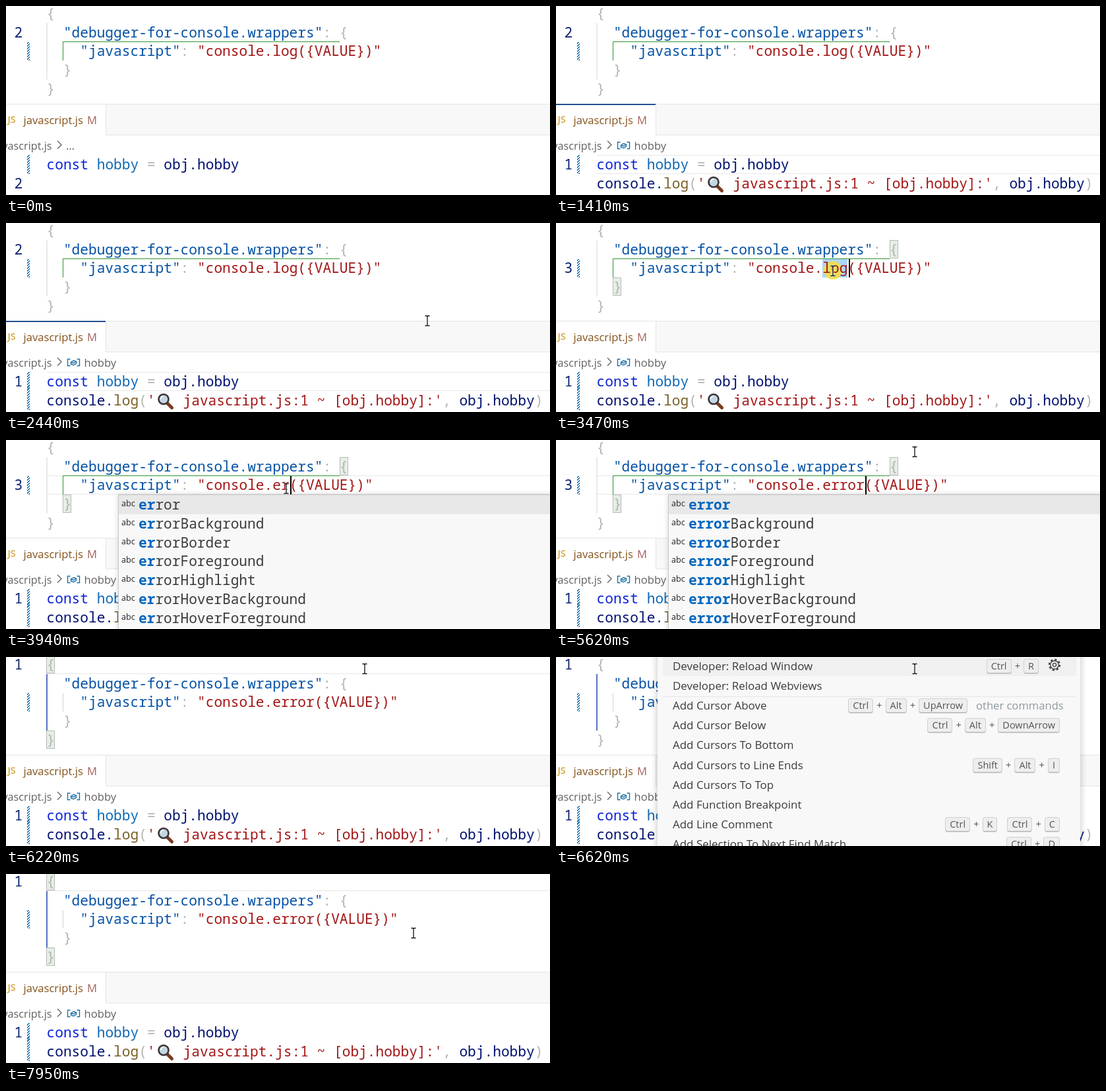
Write an HTML page that moves like this. It is 825x288 px and loops after 8 s.

```html
<!DOCTYPE html>
<html lang="en">
<head>
<meta charset="utf-8">
<title>Console wrapper demo</title>
<style>
html, body { margin: 0; width: 100%; height: 100%; overflow: hidden; background: #fff; }
#stage { position: relative; width: 825px; height: 288px; overflow: hidden; background: #fff; }
#stage div, #stage svg { position: absolute; }
.code { font: 21.17px/28.7px "Noto Sans Mono", monospace; white-space: pre; margin-top: -.7px; font-variant-ligatures: none; }
.ui { font: 16.6px/24px "Open Sans", sans-serif; white-space: pre; }
.num { left: 12.5px; color: #0b216f; }
.p { color: #b3b3b3; }
.k { color: #0451a5; }
.s { color: #a31515; }
.kw { color: #0a22d8; }
.c { color: #0f68b4; }
.v { color: #001070; }
.f { color: #795e26; }
.row { left: 62px; width: 763px; height: 27px; border: solid #e8e8e8; border-width: 1px 0; }
.brace { width: 11px; height: 26px; background: rgba(0,100,0,.1); border: 1px solid #b9b9b9; }
.hatch { left: 32px; width: 4px; background: repeating-linear-gradient(-45deg, #1672ad 0 1.6px, #fff 1.6px 2.9px); }
.caret { width: 2px; height: 28px; background: #000; }
#sel { background: #add6ff; top: 55px; height: 28px; }
#disc { width: 28px; height: 28px; margin: -14px; border-radius: 50%; background: #f0df48; opacity: .9; }
#bar { left: 152px; top: 150px; width: 673px; height: 46px; background: #f8f8f8; border-bottom: 1px solid #e5e5e5; }
#popup { left: 170px; top: 83px; width: 700px; height: 240px; background: #f8f8f8; border: 1px solid #c8c8c8; box-shadow: 0 0 8px rgba(0,0,0,.16); }
#popup .code { left: 30px; color: #3b3b3b; }
#popup b { color: #0066bf; font-weight: 600; }
#popup .abc { left: 4px; font: 500 12.6px/24px "Open Sans", sans-serif; color: #222; }
#pick { left: 0; top: 0; width: 700px; height: 28.5px; background: #e8e8e8; }
#palette { left: 154px; top: -40px; width: 641px; height: 380px; background: #f8f8f8; box-shadow: 0 0 9px 2px rgba(0,0,0,.18); }
#palette .item { left: 8px; width: 627px; height: 30px; border-radius: 4px; color: #3b3b3b; font: 16.95px/30px "Open Sans", sans-serif; white-space: pre; }
#palette .item span { padding-left: 15px; }
#palette .note { left: 483px; color: #8f999f; font-size: 16.6px; }
#palette .keys { top: 0; height: 30px; display: flex; align-items: center; font-size: 14.5px; color: #555; }
.keys kbd { font: 14.5px/20px "Open Sans", sans-serif; padding: 0 6px; border: 1px solid #d0d0d0; border-bottom-color: #bbb; border-radius: 4px; background: #eee; box-shadow: 0 1px 0 #ccc; }
.keys i { font-style: normal; width: 18.5px; text-align: center; }
.keys u { width: 15px; }
</style>
</head>
<body>
<div id="stage">
  <div id="rowUp" class="row"></div>
  <div id="rowLow" class="row" style="top:227px"></div>
  <div id="sel"></div>
  <div id="braceA" class="brace"></div>
  <div id="braceB" class="brace"></div>
  <div id="disc"></div>

  <svg width="825" height="150" fill="none">
    <path id="outer" d="M62 26V112" />
    <path id="inner" d="M86.500 55V83" stroke="#d3d3d3" />
    <path id="green" d="M86.500 83V54.500H506" stroke="#319331" />
  </svg>

  <div id="numUp" class="code num"></div>
  <div id="numLow" class="code num"></div>
  <div class="hatch" style="top:55px;height:28px"></div>
  <div id="hatchLow" class="hatch" style="top:227px"></div>

  <div id="json"></div>

  <div style="left:0;top:149px;width:825px;height:1px;background:#e5e5e5"></div>
  <div id="bar"></div>
  <div style="left:151px;top:150px;width:1px;height:47px;background:#e5e5e5"></div>
  <div id="tabTop" style="left:0;top:149px;width:151px;height:1.5px;background:#24508f"></div>
  <div class="ui" style="left:2.5px;top:161px;font-size:14.5px;font-weight:600;color:#d3a63a">JS</div>
  <div class="ui" style="left:26.5px;top:162px;color:#85521a">javascript.js</div>
  <div class="ui" style="left:123px;top:162px;color:#a8605a">M</div>

  <div class="ui" style="right:755.5px;top:201px;color:#616161;font-size:16.2px">javascript.js</div>
  <svg width="120" height="24" style="left:0;top:200px" fill="none">
    <path d="M78 5.500l6 6-6 6" stroke="#616161" stroke-width="1.3" />
    <path id="symbol" d="M97.500 7.500h-4v10h4M107.500 7.500h4v10h-4M98.500 12l4-2.500 4 1.500v3l-4 2.500-4-1.500zl4 1.500 4-2.500" stroke="#1d6fa5" stroke-width="1.400" />
  </svg>
  <div id="crumb" class="ui" style="top:201px;color:#616161"></div>

  <div class="code" style="left:61.5px;top:227.8px"><span class="kw">const</span> <span class="c">hobby</span> <span class="p">=</span> <span class="v">obj.hobby</span></div>
  <div id="logLine" style="left:0;top:256.6px">
    <div class="code" style="left:61.5px"><span class="v">console.</span><span class="f">log</span><span class="p">(</span><span class="s">'</span></div>
    <svg width="30" height="30" style="left:227px;top:0">
      <path d="M18 18l6.500 6.500" stroke="#7a3b20" stroke-width="5" stroke-linecap="round" />
      <circle cx="12" cy="11.500" r="7.500" fill="#c3d6e2" stroke="#3a3335" stroke-width="2.600" />
      <path d="M8 11a4 4 0 0 1 4-4" stroke="#fff" stroke-width="1.600" fill="none" />
    </svg>
    <div class="code" style="left:268.5px"><span class="s">javascript.js:1 ~ [obj.hobby]:'</span><span class="p">,</span> <span class="v">obj.hobby</span><span class="p">)</span></div>
  </div>

  <div id="caret" class="caret"></div>
  <div id="popup"><div id="pick"></div></div>
  <div id="palette"></div>
  <svg id="mouse" width="12" height="20" viewBox="-6 -10 12 20" style="margin:-10px 0 0 -6px" fill="none">
    <path d="M-3.500-7.500h2.500l1 1 1-1h2.500M0-6.500V6.500M-3.500 7.500h2.500l1-1 1 1h2.500" stroke="#fff" stroke-width="3" opacity=".7" />
    <path d="M-3.500-7.500h2.500l1 1 1-1h2.500M0-6.500V6.500M-3.500 7.500h2.500l1-1 1 1h2.500" stroke="#111" stroke-width="1.300" />
  </svg>
</div>

<script>
const LOOP = 8000, CH = 12.7, LH = 28.7, LEFT = 61.5;
const $ = id => document.getElementById(id);
const rowTop = line => 26.2 + LH * (line - 2);
const colX = col => LEFT + CH * col;

function add(parent, cls, html, style) {
  const el = document.createElement('div');
  el.className = cls;
  el.innerHTML = html;
  Object.assign(el.style, style);
  parent.append(el);
  return el;
}

const json = [
  '<span class="p">{</span>',
  '  <span class="k">"debugger-for-console.wrappers"</span><span class="p">: {</span>',
  '    <span class="k">"javascript"</span><span class="p">:</span> <span class="s">"console.<span id="word">log</span>({VALUE})"</span>',
  '  <span class="p">}</span>',
  '<span class="p">}</span>'
];
json.forEach((html, i) => add($('json'), 'code', html, { left: LEFT + 'px', top: rowTop(i + 1) + 'px' }));

const options = ['', 'Background', 'Border', 'Foreground', 'Highlight', 'HoverBackground', 'HoverForeground'].map((tail, i) => {
  const top = i * 28.8;
  add($('popup'), 'abc', 'abc', { top: top + 1 + 'px' });
  return { tail, el: add($('popup'), 'code', '', { top: top + .6 + 'px' }) };
});

// label, shortcut, right edge of the shortcut
const commands = [
  ['Developer: Reload Window', 'Ctrl+R', 732],
  ['Developer: Reload Webviews'],
  ['Add Cursor Above', 'Ctrl+Alt+UpArrow', 624],
  ['Add Cursor Below', 'Ctrl+Alt+DownArrow'],
  ['Add Cursors To Bottom'],
  ['Add Cursors to Line Ends', 'Shift+Alt+I'],
  ['Add Cursors To Top'],
  ['Add Function Breakpoint'],
  ['Add Line Comment', 'Ctrl+K Ctrl+C'],
  ['Add Selection To Next Find Match', 'Ctrl+D']
];
const chord = keys => keys.split('+').map(k => `<kbd>${k}</kbd>`).join('<i>+</i>');
commands.forEach(([label, keys, right = 764], i) => {
  const item = add($('palette'), 'item', `<span>${label}</span>`, { top: 39 + 30.1 * i + 'px' });
  if (i === 0) item.style.background = '#f0f0f0';
  if (keys) add(item, 'keys', keys.split(' ').map(chord).join('<u></u>'), { right: 789 - right + 'px' });
});
add($('palette'), '', '', { left: '8px', top: '99.500px', width: '627px', height: '1px', background: '#e6e6e6' });
add($('palette'), 'item note', 'other commands', { top: '99.200px', width: '140px' });
$('palette').insertAdjacentHTML('beforeend',
  `<svg width="24" height="24" style="left:590px;top:40px" fill="none" stroke="#444">
    <circle cx="12" cy="12" r="2.600" stroke-width="1.400"/><circle cx="12" cy="12" r="6.300" stroke-width="1.400"/>
    <circle cx="12" cy="12" r="8" stroke-width="2.400" stroke-dasharray="3.140 3.143"/></svg>`);

// steps: [start, value], the last one reached wins
const pick = (t, steps) => steps.reduce((v, [at, next]) => t >= at ? next : v, steps[0][1]);
const within = (t, spans) => spans.some(([a, b]) => t >= a && t < b);
const show = (id, on) => { $(id).style.display = on ? '' : 'none'; };
const place = (id, x, y) => Object.assign($(id).style, { left: x + 'px', top: y + 'px' });

const path = [
  [130, 830, 40], [640, 309, 243], [780, 309, 243], [880, 640, 300],
  [1900, 700, 300], [2400, 640, 150], [2790, 470, 60], [3060, 420, 73],
  [3510, 420, 73], [3540, 425, 74], [5010, 425, 74], [5550, 544, 18],
  [7670, 544, 18], [7950, 618, 90]
];

// the pointer moves in 70 ms steps
function mouseAt(t) {
  const q = Math.floor((t - 40) / 70) * 70 + 40;
  const i = path.findIndex(p => p[0] > q);
  if (i < 1) return i ? path[path.length - 1].slice(1) : path[0].slice(1);
  const [a, b] = [path[i - 1], path[i]];
  const u = (q - a[0]) / (b[0] - a[0]), e = u * u * (3 - 2 * u);
  return [a[1] + (b[1] - a[1]) * e, a[2] + (b[2] - a[2]) * e];
}

function caretAt(t, word) {
  if (within(t, [[710, 1210], [1610, 2110], [2610, 3110]])) return [19, 227];
  if (within(t, [[3130, 4860], [5360, 5750]])) return [t < 3340 ? 28 : 27 + word.length, 55];
  if (within(t, [[5750, 6220], [7350, 7810]])) return [1, -2];
}

function render(t) {
  const focus = pick(t, [[0, ''], [710, 'low'], [3130, 'up'], [6570, ''], [7350, 'up']]);
  const line = pick(t, [[0, 2], [3130, 3], [5750, 1]]);
  const lowLine = t < 710 ? 2 : 1;
  const word = pick(t, [[0, 'log'], [3670, 'e'], [3870, 'er'], [4070, 'err'], [4270, 'erro'], [4400, 'error']]);
  const selected = within(t, [[3340, 3670]]);
  const top = line === 1;

  $('word').textContent = word;
  $('numUp').textContent = line;
  $('numUp').style.top = rowTop(line) + 'px';
  $('numLow').textContent = lowLine;
  $('numLow').style.top = 227.8 + LH * (lowLine - 1) + 'px';

  show('rowUp', focus === 'up' && !selected);
  $('rowUp').style.top = Math.floor(rowTop(line)) + 'px';
  show('rowLow', focus === 'low');
  show('tabTop', focus === 'low');
  show('sel', selected);
  place('sel', colX(27), 55);
  $('sel').style.width = 3 * CH + 'px';

  show('braceA', focus === 'up');
  show('braceB', focus === 'up');
  place('braceA', top ? 61 : 506, Math.floor(rowTop(top ? 1 : 2)));
  place('braceB', top ? 61 : 86, Math.floor(rowTop(top ? 5 : 4)));

  $('outer').setAttribute('stroke', top ? '#2443ae' : '#d3d3d3');
  $('outer').setAttribute('stroke-width', top ? 1.5 : 1);
  show('inner', top);
  show('green', !top);

  show('symbol', lowLine === 1);
  $('crumb').textContent = lowLine === 1 ? 'hobby' : '…';
  $('crumb').style.left = lowLine === 1 ? '118.5px' : '91px';
  show('logLine', t >= 1410);
  $('hatchLow').style.height = t >= 1680 ? '58px' : '29px';

  const caret = caretAt(t, word);
  show('caret', caret);
  if (caret) place('caret', Math.round(colX(caret[0]) + 1), caret[1]);

  show('popup', within(t, [[3770, 5750]]));
  for (const { tail, el } of options) {
    el.innerHTML = `<b>${word}</b>${'error'.slice(word.length)}${tail}`;
  }
  show('palette', within(t, [[6570, 7310]]));

  const [x, y] = mouseAt(t);
  show('mouse', within(t, [[130, 880], [1960, LOOP]]));
  place('mouse', x, y);
  show('disc', within(t, [[640, 780], [3130, 3200], [3340, 3540], [5750, 5820]]));
  place('disc', x, y - 1);
}

const start = performance.now();
function tick() {
  render((performance.now() - start) % LOOP);
  requestAnimationFrame(tick);
}
tick();
</script>
</body>
</html>
```
